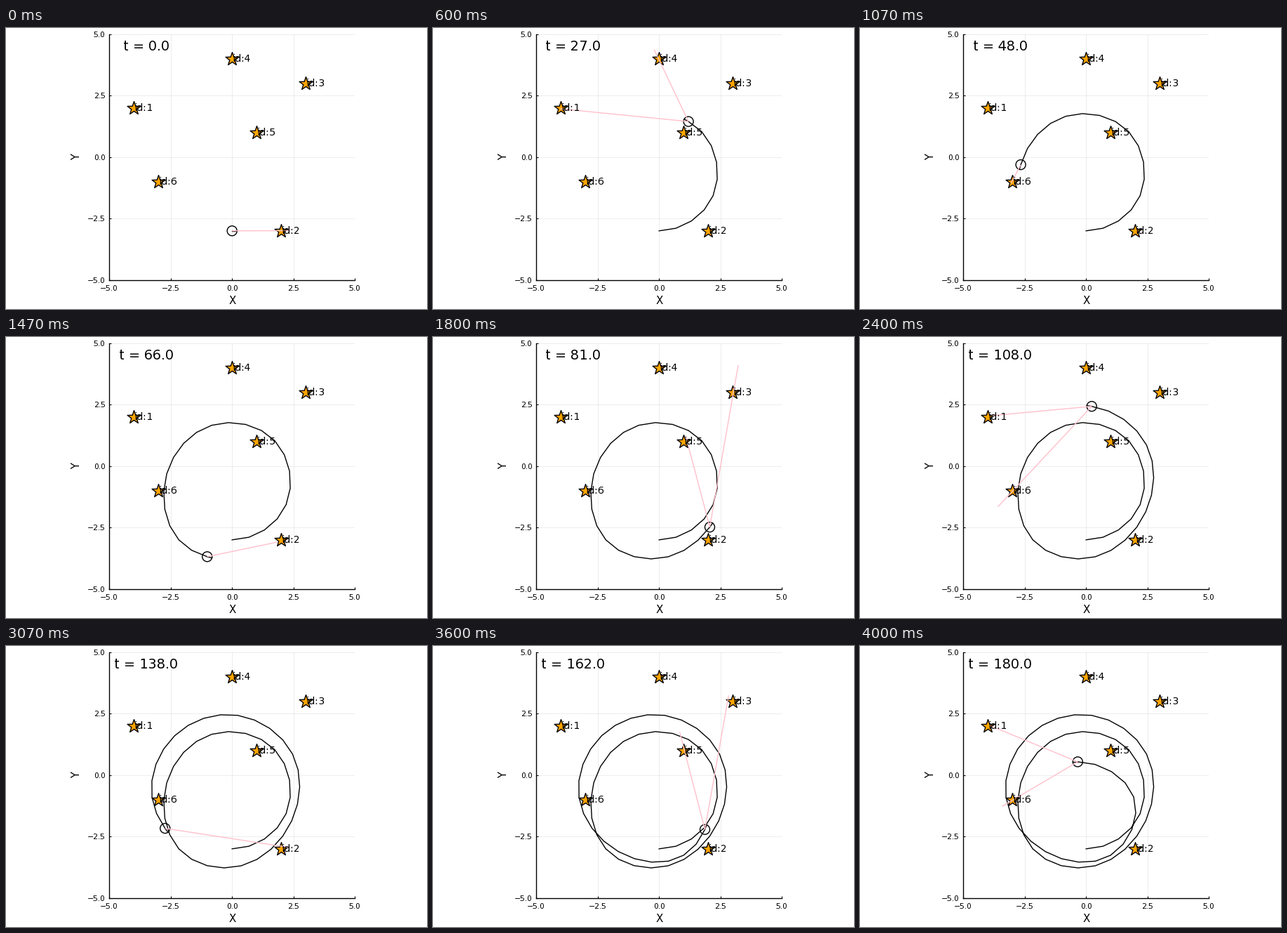
A matplotlib script that plays this animation: 600x400 px, repeating every 4070 ms.

```python
import matplotlib.pyplot as plt
import numpy as np
from matplotlib.animation import FuncAnimation
from matplotlib.collections import LineCollection
from matplotlib.patches import Circle
from matplotlib.path import Path

W, H = 600, 400
LOOP, FRAMES = 4070, 185        # ms, drawn frames
FPS, DT, STEPS = 15, 3.0, 60    # simulation steps per second, seconds per step
LEFT, BOTTOM, SIZE = 147.2, 358.75, 350
RADIUS = 0.2
NEAR, FAR, FOV = 0.5, 6.0, np.radians(58.5)

# Whole-pixel letter spacing
plt.rcParams.update({"font.family": "DejaVu Sans", "text.hinting_factor": 1})

landmarks = np.array([(-4, 2), (2, -3), (3, 3), (0, 4), (1, 1), (-3, -1)], float)

# The drive: one knot every four steps, joined by a smooth spline
knots = np.array([
    (0, -3), (2.2, -1.57), (1.74, 1.03), (-0.83, 1.66), (-2.66, -0.31),
    (-2.17, -3), (0.37, -3.69), (2.43, -1.86), (2.46, 0.86), (0.23, 2.43),
    (-2.34, 1.6), (-3.26, -0.91), (-1.66, -3.11), (1, -3.26), (1.94, -0.89),
    (-0.34, 0.54)])
START_VEL, END_VEL = (2.8, 0), (-2.8, 0)


def spline(p, v0, v1, count):
    """Points and directions on a clamped cubic spline through p."""
    n = len(p)
    system = 4 * np.eye(n) + np.eye(n, k=1) + np.eye(n, k=-1)
    system[0], system[-1] = np.eye(n)[0], np.eye(n)[-1]
    v = np.linalg.solve(system, np.vstack([v0, 3 * (p[2:] - p[:-2]), v1]))

    u = np.linspace(0, n - 1, count)
    i = np.minimum(u.astype(int), n - 2)
    s = (u - i)[:, None]
    a, d, va, vb = p[i], p[i + 1] - p[i], v[i], v[i + 1]
    c2, c3 = 3 * d - 2 * va - vb, va + vb - 2 * d
    pos = a + s * (va + s * (c2 + s * c3))
    vel = va + s * (2 * c2 + 3 * s * c3)
    return pos, np.arctan2(vel[:, 1], vel[:, 0])


path, heading = spline(knots, START_VEL, END_VEL, STEPS + 1)


def beams(step):
    """Noisy sightings of the landmarks in the robot's field of view."""
    rng = np.random.default_rng(step)
    pos, segments = path[step], []
    for dx, dy in landmarks - pos:
        dist, angle = np.hypot(dx, dy), np.arctan2(dy, dx)
        scale, error = rng.normal(1.1, 0.12), rng.normal(0, 0.03)
        off = (angle - heading[step] + np.pi) % (2 * np.pi) - np.pi
        if NEAR <= dist <= FAR and abs(off) <= FOV:
            a = angle + error
            end = pos + dist * scale * np.array([np.cos(a), np.sin(a)])
            segments.append([pos, end])
    return segments


fig = plt.figure(figsize=(W / 100, H / 100), dpi=100, facecolor="white")
ax = fig.add_axes([LEFT / W, 1 - BOTTOM / H, SIZE / W, SIZE / H])
ticks = np.arange(-5, 5.1, 2.5)
ax.set(xlim=(-5, 5), ylim=(-5, 5), xticks=ticks, yticks=ticks)
ax.set_axisbelow(True)
ax.grid(color="black", alpha=0.1, lw=0.5)
ax.spines[["top", "right"]].set_visible(False)
ax.spines[["left", "bottom"]].set_linewidth(1)
ax.tick_params(direction="in", length=2.2, width=0.8, labelsize=8)
ax.tick_params(axis="x", pad=5.1)
ax.tick_params(axis="y", pad=3.9)

center = dict(ha="center", va="center")
fig.text(322.2 / W, 1 - 388.4 / H, "X", size=11, **center)
fig.text(100.4 / W, 1 - 183.75 / H, "Y", size=11, rotation=90, **center)

ax.plot(*landmarks.T, ls="none", marker=Path.unit_regular_star(5, 0.4),
        ms=14.2, mfc="orange", mec="black", mew=1, zorder=2)
for i, (x, y) in enumerate(landmarks, 1):
    ax.text(x, y, f"id:{i}", size=10, ha="left", va="center", zorder=6)

trail, = ax.plot([], [], color="black", lw=1, zorder=3)
nose, = ax.plot([], [], color="black", lw=1, zorder=4)
body = ax.add_patch(Circle((0, 0), RADIUS, fill=False, ec="black", lw=1, zorder=4))
rays = ax.add_collection(LineCollection([], colors="pink", linewidths=1, zorder=5),
                         autolim=False)
clock = ax.text(-3.5, 4.5, "", size=14, zorder=6, **center)


def update(frame):
    ms = frame * LOOP / FRAMES + 25     # switch on the drawn frame nearest each step
    step = min(int(ms * FPS / 1000), STEPS)
    x, y = path[step]
    a = heading[step]
    trail.set_data(*path[:step + 1].T)
    nose.set_data([x, x + RADIUS * np.cos(a)], [y, y + RADIUS * np.sin(a)])
    body.center = x, y
    rays.set_segments(beams(step))
    clock.set_text(f"t = {step * DT:.1f}")
    return trail, nose, body, rays, clock


anim = FuncAnimation(fig, update, frames=FRAMES, interval=LOOP / FRAMES,
                     repeat=True, repeat_delay=0, blit=False)
plt.show()
```
